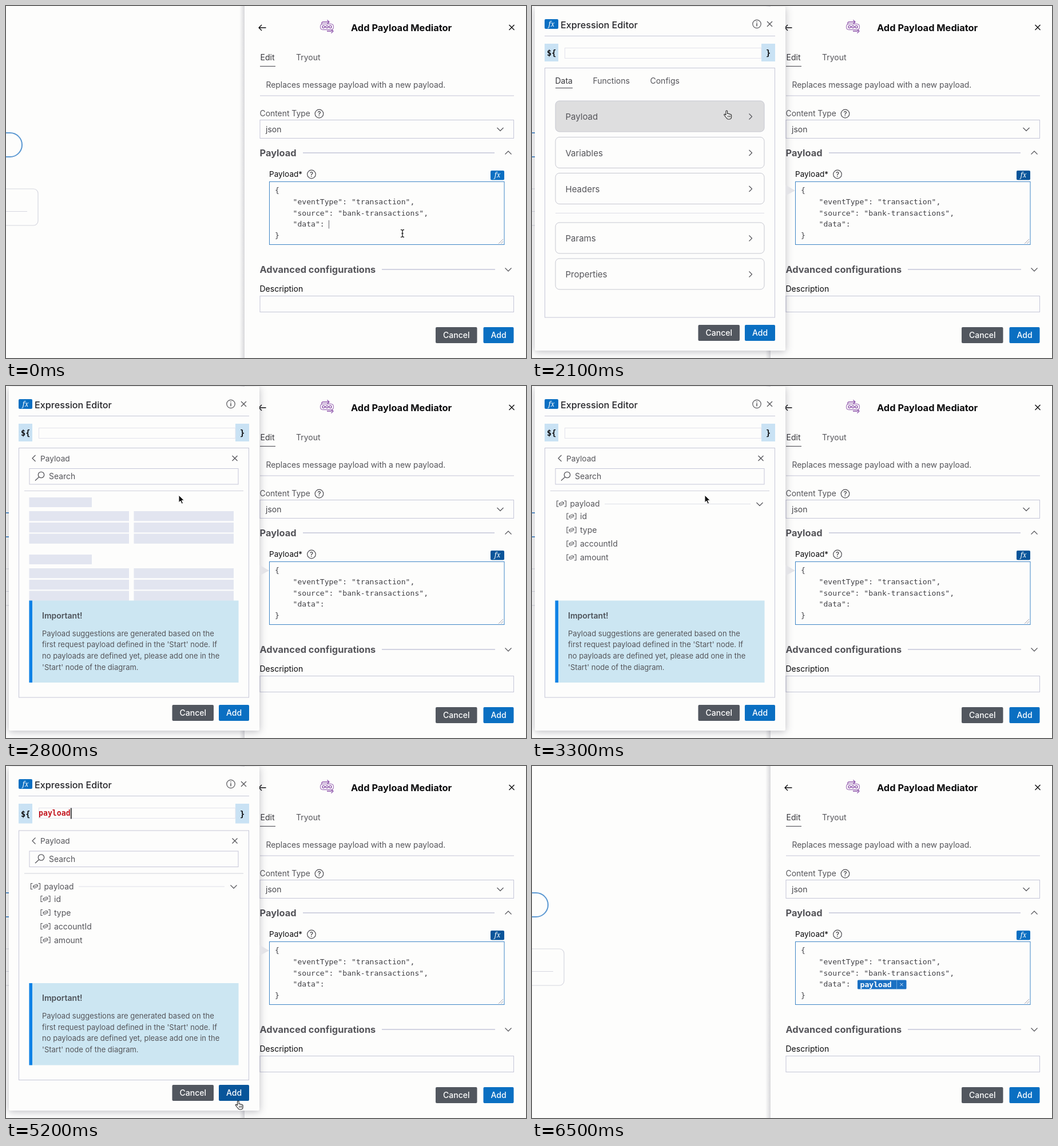
These frames come from a looping animation (909x616 px, 6600 ms). An HTML page:

```html
<!DOCTYPE html>
<html lang="en">
<head>
<meta charset="utf-8">
<title>Payload mediator form</title>
<style>
  html, body { margin: 0; width: 100%; height: 100%; overflow: hidden; background: #fdfdfc; }
  svg { display: block; width: 100vw; height: 100vh; }
  text { font-family: Inter, "Open Sans", sans-serif; white-space: pre; }
  .mono { font-family: "DejaVu Sans Mono", monospace; }
  .fx { font-family: "Noto Serif", serif; font-style: italic; }
  #dialog > rect:first-child { filter: drop-shadow(0 2px 7px rgba(30, 30, 50, .28)); }
</style>
</head>
<body>
<svg id="stage" viewBox="0 0 909 616"></svg>
<script>
const BLUE = '#0a6fc2', DARK = '#08559a', GREY = '#52575f', INK = '#0c0c0e', BODY = '#55555a', LINE = '#c5c6d8', PAPER = '#fdfdfc';

const text = (x, y, s, size = 14, fill = BODY, weight = 400, cls = '') =>
  `<text x="${x}" y="${y}" font-size="${size}" fill="${fill}" font-weight="${weight}" class="${cls}">${s}</text>`;
const heading = (x, y, s, fill = BODY) => text(x, y, s, 16.4, fill, 700);
const rect = (x, y, w, h, fill = 'none', stroke = 'none', r = 0, id = '') =>
  `<rect x="${x}" y="${y}" width="${w}" height="${h}" fill="${fill}" stroke="${stroke}" rx="${r}" id="${id}"/>`;
const path = (d, stroke = BODY, width = 1.2, fill = 'none') =>
  `<path d="${d}" stroke="${stroke}" stroke-width="${width}" fill="${fill}" stroke-linejoin="round"/>`;
const circle = (x, y, r, stroke, width = 1.2) =>
  `<circle cx="${x}" cy="${y}" r="${r}" fill="none" stroke="${stroke}" stroke-width="${width}"/>`;
const group = (id, ...parts) => `<g id="${id}">${parts.join('')}</g>`;

const cross = (x, y, r, color = BODY, w = 1.3) =>
  path(`M${x - r} ${y - r}l${2 * r} ${2 * r}m0 ${-2 * r}l${-2 * r} ${2 * r}`, color, w);
const down = (x, y) => path(`M${x - 5.5} ${y - 2.5}l5.5 5.5 5.5-5.5`);
const up = (x, y) => path(`M${x - 5.5} ${y + 2.5}l5.5-5.5 5.5 5.5`);
const right = (x, y) => path(`M${x - 2.5} ${y - 5}l5 5-5 5`);
const help = (x, y) => circle(x, y, 7.3, '#4a4a50') +
  `<text x="${x}" y="${y + 4}" font-size="11.5" font-weight="500" fill="#3c3c42" text-anchor="middle">?</text>`;
const fxBadge = (x, y, w, h, id) => rect(x, y, w, h, BLUE, 'none', 2, id) +
  `<text class="fx" x="${x + w / 2}" y="${y + h / 2 + 4}" font-size="12" font-weight="500" fill="#fff" text-anchor="middle">fx</text>`;
const buttons = (x, y, addX, id) => rect(x, y, 72.5, 28, GREY, 'none', 2) + text(x + 13, y + 19, 'Cancel', 14, '#fff', 500) +
  rect(addX, y, 53, 28, BLUE, 'none', 2, id) + text(addX + 13, y + 19, 'Add', 14, '#fff', 500);
const fieldIcon = (x, y) => path(`M${x + 3} ${y - 5}h-3v10h3M${x + 13} ${y - 5}h3v10h-3`, BODY, 1.1) +
  path(`M${x + 4} ${y - .5}l5.5-3 2.5 1.5v2.5l-5.5 3-2.5-1.5zM${x + 4} ${y - .5}l2.5 1.5 5.5-3`, BODY, 1);

const backdrop = `
  <defs>
    <linearGradient id="shade"><stop stop-color="#445" stop-opacity="0"/><stop offset="1" stop-color="#445" stop-opacity=".2"/></linearGradient>
  </defs>` +
  rect(0, 0, 417, 616, PAPER) +
  path('M0 222h7a21 21 0 0 1 0 42h-7', '#5b98d2', 2) +
  path('M0 320h48a8 8 0 0 1 8 8v48a8 8 0 0 1-8 8H0M0 359.500h37', '#d6d7e0') +
  rect(408, 0, 9, 616, 'url(#shade)') + rect(417, 0, 492, 616, PAPER);

const mediatorIcon = path('M552 34.500v-4.500q0-2 2-2h11m-3.500-3.500l3.500 3.500-3.500 3.500M570 38v4q0 2-2 2h-7m7.500-3.500l3.500 3.500-3.500 3.500', '#8a4fa8', 1.3) +
  rect(549.5, 31.5, 23, 10, PAPER, '#8a4fa8', 4) +
  [555, 561, 567].map(x => circle(x, 36.5, 2.1, '#8a4fa8', 1.3)).join('');

const code = ['{', '    "eventType": "transaction",', '    "source": "bank-transactions",', '    "data":', '}']
  .map((s, i) => text(470, 327 + i * 19.8, s, 13.1, '#414146', 400, 'mono')).join('');

const form =
  path('M454.500 38H442m5-5l-5 5 5 5', INK, 1.4) + mediatorIcon +
  heading(603, 44, 'Add Payload Mediator', INK) + cross(884, 37.5, 4.5, INK, 1.4) +
  text(444.5, 95, 'Edit', 14, '#38383d') + path('M444 105.500h27', '#5a5a62') + text(507, 95, 'Tryout') +
  text(454.5, 142.5, 'Replaces message payload with a new payload.', 13.9) + path('M444 157h444', LINE) +
  text(443.5, 193, 'Content Type', 13.9) + help(547.5, 188.5) +
  rect(444, 199.5, 443.5, 32, PAPER, LINE) + text(454, 220.5, 'json', 14, '#47474c') + down(864, 215.5) +
  heading(443.5, 263, 'Payload') + path('M519 257h335', LINE, 1.4) + up(878, 257) +
  text(460, 299, 'Payload*', 13.6, INK) + help(534, 294.5) + fxBadge(847, 288, 24, 16.5, 'fxButton') +
  rect(460.5, 307.5, 410.5, 110, PAPER, '#3f86c6') + path('M861 416l8-8m-4 8l4-4', '#a5a5b0', 1) + code +
  heading(443.5, 467, 'Advanced configurations') + path('M657 461h198', LINE, 1.4) + down(878, 461) +
  text(443.5, 500, 'Description', 14, INK) + rect(444, 507.5, 443.5, 28, PAPER, LINE) +
  buttons(751, 562, 834.5, 'formAdd') +
  group('caret', path('M564.500 375v14.500', '#66666b', 1)) +
  group('chip', rect(569, 374.5, 85.5, 16, '#1a70c3', 'none', 1.5),
    text(573.5, 387, 'payload', 13.1, '#fff', 700, 'mono'), path('M637.500 375v15', '#69a4dc', 1), cross(646, 382.5, 2.6, '#dceaf8', 1));

const rows = [['Payload', 166], ['Variables', 229.5], ['Headers', 292.5], ['Params', 379], ['Properties', 442]]
  .map(([s, y], i) => rect(41, y, 365, 54, PAPER, '#c6c7d0', 7, 'row' + i) + text(58.5, y + 33, s, 15) + right(382, y + 27.5)).join('');

const skeleton = [195, 295].map(y => rect(40.5, y, 109.5, 17, '#e2e5f0') +
  [24, 44, 63.5].map(d => rect(40.5, y + d, 174.5, 17.3, '#e2e5f0') + rect(223.5, y + d, 174.5, 17.3, '#e2e5f0')).join('')).join('');

const fields = ['id', 'type', 'accountId', 'amount']
  .map((s, i) => fieldIcon(61, 228 + i * 24) + text(84, 233 + i * 24.1, s, 14)).join('');

const notice = ['Payload suggestions are generated based on the', "first request payload defined in the 'Start' node. If",
  'no payloads are defined yet, please add one in the', "'Start' node of the diagram."]
  .map((s, i) => text(63, 437.5 + i * 19.7, s, 13)).join('');

const dialog = group('dialog',
  rect(5, 1, 438, 602, PAPER, 'none', 2),
  path('M443 313l17 10-17 9z', 'none', 0, '#e4e4e8'),
  fxBadge(22, 23, 24, 17, 'titleFx'), text(50, 38.5, 'Expression Editor', 16.2, '#26262b', 500),
  circle(393, 31.5, 7.2, BODY), path('M393 30v5.500M393 27v1.500', BODY, 1.5), cross(415.5, 31.5, 4.5),
  path('M22 52.500h403', LINE, 1),
  rect(22, 66, 24, 31, '#c9e2f4', 'none', 0, 'openBox'), rect(401, 66, 24, 31, '#c9e2f4', 'none', 0, 'closeBox'),
  group('braces', text(26, 87, '${', 13.5, INK, 700, 'mono'), text(409, 87, '}', 13.5, INK, 700, 'mono')),
  rect(57.5, 73.5, 343.5, 18, 'none', '#e2e2ec'),
  group('typed', text(57, 87, 'payload', 13.2, '#c2161f', 700, 'mono'), group('typedCaret', path('M113.800 73.500v19', '#111', 1.5))),
  group('content',
    rect(22.5, 108.5, 402, 436.5, 'none', LINE),
    group('menu', text(40.5, 136, 'Data', 14, '#38383d'), path('M41 143.500h30', '#5a5a62'),
      text(106.5, 136, 'Functions'), text(206.5, 136, 'Configs'), rows, path('M41 362.500h365', '#dddde5', 1)),
    group('detail', path('M51.500 121l-5.500 5.500 5.500 5.500'), text(60, 131.5, 'Payload', 13.7), cross(400, 126.5, 4.5),
      rect(41, 144.5, 365, 27.5, PAPER, LINE), circle(61.5, 155.5, 5.2, BODY, 1.3), path('M57.500 159.500l-6.500 6'),
      text(75, 163, 'Search', 13.9), path('M32 183.500h383', '#d0d1dc'),
      group('loading', skeleton),
      group('list', fieldIcon(43.5, 206), text(66.5, 211, 'payload', 13.8), path('M127 206.500h255', '#dedfe8', 1), down(398, 206.5), fields),
      rect(40.5, 375.5, 366, 143.5, '#cce6f2'), rect(40.5, 375.5, 5.5, 143.5, '#0f82e6'),
      text(63, 406.5, 'Important!', 14, '#4c5158', 600), notice)),
  buttons(290.5, 558, 372, 'dialogAdd'));

// Pointer shapes have their hot spot at the origin.
const pointers =
  group('ibeam', path('M-3-6.500q3 0 3 2v9q0 2 3 2m-6 0q3 0 3-2v-9q0-2 3-2M-1.500 0h3', '#222', 1.3)) +
  group('arrow', path('M0 0v13l3-2.800 2.200 5 2.300-1-2.200-4.900h4.200z', '#fff', 1, '#111')) +
  group('hand', path('M-1.500 1.500q0-1.500 1.300-1.500t1.300 1.500v4q2.200-.8 2.600.6 2-.6 2.400.8 2-.4 2 1.300v3q0 3.800-4.300 3.800h-1.300q-1.800 0-3-2l-4-5q-.8-1.800 1-1.700l2 1.600z', '#222', 1.1, '#fff') +
    path('M1.800 8.500v3.500m2.200-3.500v3.500m2-3.500v3.500', '#222', .9));

const stage = document.getElementById('stage');
stage.innerHTML = backdrop + form + dialog + group('pointer', pointers);

const el = id => document.getElementById(id);
const show = (id, on) => el(id).style.display = on ? '' : 'none';
const fill = (id, color) => el(id).setAttribute('fill', color);
const move = (id, x, y) => el(id).setAttribute('transform', `translate(${x} ${y})`);

const LOOP = 6600, OPEN = 1300, PICK = 2400, LOADED = 3300, TYPED = 4600, CLOSE = 5800;
const track = [[0, 693, 398], [400, 693, 398], [1000, 857, 290], [1350, 857, 290], [2000, 340.5, 183], [2400, 340.5, 183],
  [2800, 302, 191], [3400, 302, 191], [4200, 86, 189], [4450, 88, 202], [4700, 88, 202], [5200, 406, 586], [LOOP, 406, 586]];

function pointerAt(t) {
  const i = track.findIndex(k => k[0] > t), [t0, x0, y0] = track[i - 1], [t1, x1, y1] = track[i];
  const u = (t - t0) / (t1 - t0), e = u * u * (3 - 2 * u);
  return [x0 + (x1 - x0) * e, y0 + (y1 - y0) * e];
}

function pointerKind(t, x, y) {
  const inside = (l, top, r, b) => x >= l && x <= r && y >= top && y <= b;
  const open = t >= OPEN && t < CLOSE;
  if (!open && inside(460, 307, 871, 418)) return 'ibeam';
  if (inside(847, 287, 871, 305)) return 'hand';
  if (open && t < PICK && inside(41, 166, 406, 220)) return 'hand';
  if (t >= LOADED && inside(41, 197, 406, 312)) return 'hand';
  if (inside(372, 557, 426, 587)) return 'hand';
  return 'arrow';
}

function draw(now) {
  const t = now % LOOP, open = t >= OPEN && t < CLOSE, typed = t >= TYPED, blink = t % 1000 < 500;
  const [x, y] = pointerAt(t), kind = pointerKind(t, x, y), shift = typed ? 4.5 : 0;
  show('dialog', open);
  show('caret', t < OPEN && blink);
  show('chip', t >= CLOSE);
  show('menu', t < PICK);
  show('detail', t >= PICK);
  show('loading', t < LOADED);
  show('list', t >= LOADED);
  show('typed', typed);
  show('typedCaret', blink);
  move('content', 0, shift);
  move('braces', 0, shift / 2);
  for (const id of ['openBox', 'closeBox']) el(id).setAttribute('height', typed ? 34.5 : 31);
  fill('fxButton', open || t < OPEN && kind === 'hand' ? DARK : BLUE);
  fill('row0', kind === 'hand' && t < PICK ? '#dededf' : PAPER);
  fill('dialogAdd', typed && kind === 'hand' && y > 550 ? DARK : BLUE);
  show('pointer', t < CLOSE);
  move('pointer', x, y);
  for (const id of ['ibeam', 'arrow', 'hand']) show(id, id === kind);
}

const start = performance.now();
(function tick() {
  draw(performance.now() - start);
  requestAnimationFrame(tick);
})();
</script>
</body>
</html>
```
